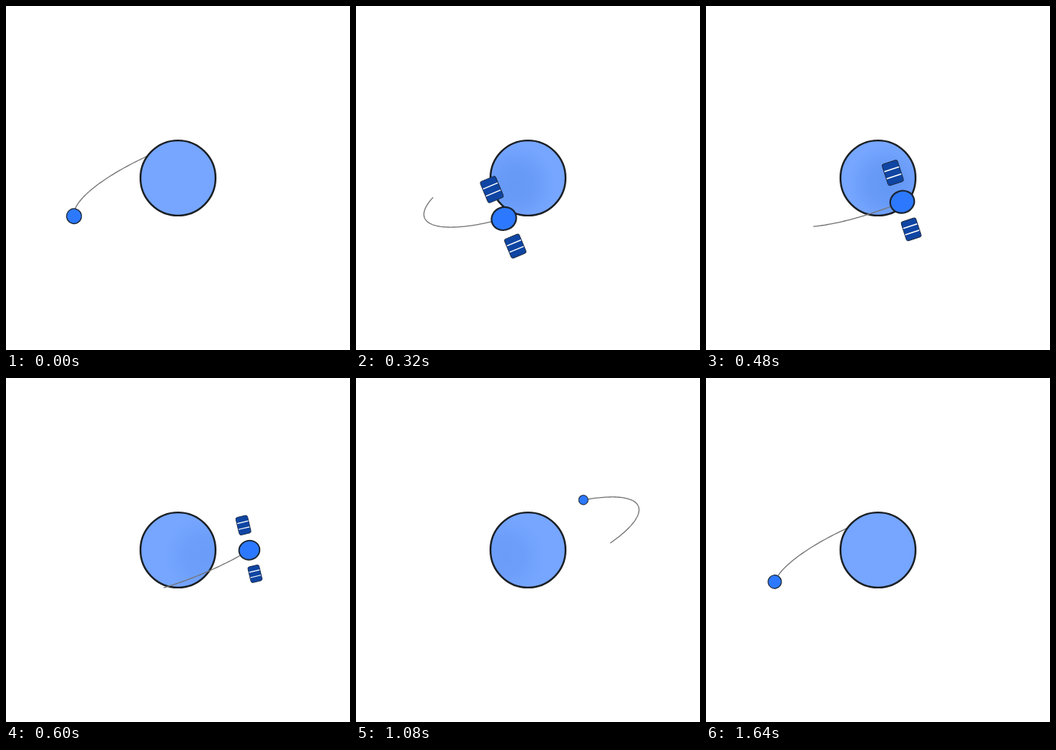
Write an HTML page with a canvas that moves like this. It is 448 by 448 pixels and loops after 1.68 s.

```html
<!DOCTYPE html>
<html lang="en">
<head>
<meta charset="utf-8">
<title>Satellite in orbit</title>
<style>
  html, body { margin: 0; width: 100%; height: 100%; overflow: hidden; background: #fff; }
  canvas { display: block; width: 448px; height: 448px; }
</style>
</head>
<body>
<canvas id="stage" width="448" height="448"></canvas>
<script>
const ctx = document.getElementById('stage').getContext('2d');
const LOOP = 1680, HALF = LOOP / 2, STEP = 40;
const RAD = Math.PI / 180;
const planet = { x: 224, y: 224, r: 48.9 };
const orbit = { x: 228.5, y: 221.5, a: 149.5, b: 41.3, tilt: -21.3 * RAD };

// Key poses as [ms, value]; angles in degrees, 0 at the left end of the orbit.
const angleKeys = [[0, -3], [320, 69], [480, 95], [560, 115], [800, 159.5],
  [1080, 235], [1360, 289], [1640, 346.6], [1680, 357]];
const scaleKeys = [[0, .6], [180, .96], [320, 1], [480, .97], [560, .9], [800, .385],
  [1080, .375], [1360, .35], [1640, .535], [1680, .6]];
const tailKeys = [[0, -83], [240, -49], [320, -30], [480, 44.5], [520, 59.4], [800, 96.5], [840, 97]];
const openKeys = [[0, 0], [200, .9], [320, 1], [480, 1], [560, .95], [800, .09], [840, 0], [1680, 0]];
const turnKeys = [[0, -30], [320, -22.5], [480, -18], [800, -8], [1680, -8]];
const leadKeys = [[0, 0], [1360, 0], [1640, 10], [1680, 0]];

// Monotone cubic interpolation through the keys.
function track(keys, t) {
  const last = keys.length - 2;
  const secant = i => (keys[i + 1][1] - keys[i][1]) / (keys[i + 1][0] - keys[i][0]);
  const slope = i => {
    if (i === 0) return secant(0);
    if (i > last) return secant(last);
    const p = secant(i - 1), q = secant(i);
    return p * q > 0 ? 2 * p * q / (p + q) : 0;
  };
  let i = 0;
  while (i < last && t >= keys[i + 1][0]) i++;
  const [t0, v0] = keys[i], [t1, v1] = keys[i + 1];
  const h = t1 - t0, u = (t - t0) / h, w = 1 - u;
  return v0 * (1 + 2 * u) * w * w + h * slope(i) * u * w * w
    + v1 * u * u * (3 - 2 * u) - h * slope(i + 1) * u * u * w;
}

function orbitPoint(deg) {
  const u = -orbit.a * Math.cos(deg * RAD), v = orbit.b * Math.sin(deg * RAD);
  const c = Math.cos(orbit.tilt), s = Math.sin(orbit.tilt);
  return [orbit.x + u * c - v * s, orbit.y + u * s + v * c];
}

const inFront = deg => Math.sin(deg * RAD) >= 0;

function drawTrail(from, to, front) {
  const steps = Math.max(1, Math.ceil((to - from) / 1.5));
  const at = i => from + (to - from) * i / steps;
  let open = false;
  ctx.beginPath();
  for (let i = 0; i < steps; i++) {
    if (inFront(at(i + .5)) !== front) { open = false; continue; }
    if (!open) ctx.moveTo(...orbitPoint(at(i)));
    ctx.lineTo(...orbitPoint(at(i + 1)));
    open = true;
  }
  ctx.strokeStyle = '#757575';
  ctx.lineWidth = 1.3;
  ctx.stroke();
}

function drawPlanet(t) {
  const h = t % HALF;
  const { x, y, r } = planet;
  ctx.beginPath();
  ctx.arc(x, y, r, 0, 2 * Math.PI);
  ctx.fillStyle = '#76a6ff';
  ctx.fill();

  const shadeX = 150 + .18 * h;
  const shade = ctx.createRadialGradient(shadeX, y + 8, 0, shadeX, y + 8, 52);
  const alpha = .7 * Math.sin(Math.PI * h / HALF) ** 2;
  shade.addColorStop(0, `rgba(90, 144, 240, ${alpha})`);
  shade.addColorStop(.45, `rgba(90, 144, 240, ${alpha * .8})`);
  shade.addColorStop(1, 'rgba(90, 144, 240, 0)');
  ctx.fillStyle = shade;
  ctx.fill();

  ctx.strokeStyle = '#1b1f24';
  ctx.lineWidth = 2.4;
  ctx.stroke();
}

function drawPanel(y, width, height, scale) {
  ctx.beginPath();
  ctx.roundRect(-width / 2, y - height / 2, width, height, Math.min(3 * scale, width / 2));
  ctx.fillStyle = '#0f45a3';
  ctx.fill();
  if (width < 3) return;
  ctx.strokeStyle = '#1b2a44';
  ctx.lineWidth = scale;
  ctx.stroke();
  ctx.beginPath();
  for (const side of [-1, 1]) {
    ctx.moveTo(-width / 2 + .5, y + side * height / 6);
    ctx.lineTo(width / 2 - .5, y + side * height / 6);
  }
  ctx.strokeStyle = '#fff';
  ctx.lineWidth = 1.5 * scale;
  ctx.stroke();
}

function drawSatellite(t, deg) {
  const scale = track(scaleKeys, t), open = track(openKeys, t);
  ctx.save();
  ctx.translate(...orbitPoint(deg));
  ctx.rotate(track(turnKeys, t) * RAD);
  if (open > .02) {
    const reach = scale * (.88 + .12 * open), tall = scale * (.6 + .4 * open);
    drawPanel(-41 * reach, 21.7 * scale * open, 30 * tall, scale);
    drawPanel(38.8 * reach, 20.8 * scale * open, 26.9 * tall, scale);
  }
  ctx.beginPath();
  ctx.ellipse(0, 0, 16.3 * scale, 16.3 * scale * (1 - .09 * open), 0, 0, 2 * Math.PI);
  ctx.fillStyle = '#2c79ff';
  ctx.fill();
  ctx.strokeStyle = '#1b2430';
  ctx.lineWidth = Math.max(1, 2.2 * scale);
  ctx.stroke();
  ctx.restore();
}

function draw(t) {
  const deg = track(angleKeys, t);
  const tail = track(tailKeys, t % HALF) + (t >= HALF ? 180 : 0);
  const head = deg + track(leadKeys, t);
  const front = t < HALF;
  ctx.fillStyle = '#fff';
  ctx.fillRect(0, 0, 448, 448);
  drawTrail(tail, head, false);
  if (!front) drawSatellite(t, deg);
  drawPlanet(t);
  drawTrail(tail, head, true);
  if (front) drawSatellite(t, deg);
}

let start;
function tick(now) {
  start ??= now;
  draw(Math.floor((now - start) % LOOP / STEP) * STEP);
  requestAnimationFrame(tick);
}
draw(0);
requestAnimationFrame(tick);
</script>
</body>
</html>
```
